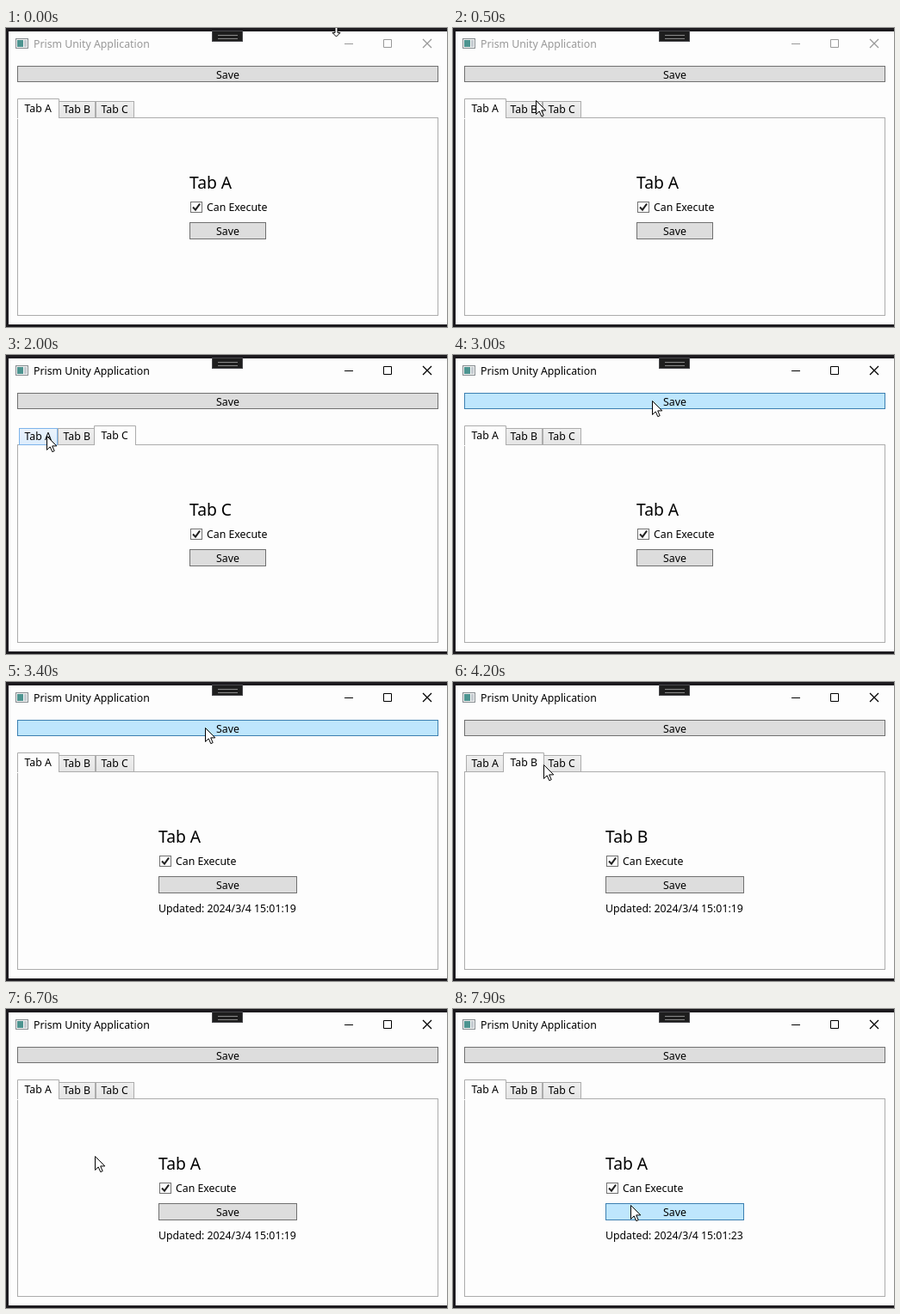
An HTML page with a canvas for the animation above (8000 ms loop, 512 by 348 pixels).

```html
<!DOCTYPE html>
<html lang="en">
<head>
<meta charset="utf-8">
<title>Tabbed window</title>
<style>
html, body { margin: 0; width: 100%; height: 100%; overflow: hidden; background: #1c1a1e; }
canvas { display: block; }
</style>
</head>
<body>
<canvas id="stage" width="512" height="348"></canvas>
<script>
const ctx = document.getElementById('stage').getContext('2d');
const LOOP = 8000, STEP = 100;
const FONT = '"Noto Sans", "Open Sans", sans-serif';
const PAPER = '#fdfdfd';

// The tabs share one pitch; right is the last pixel column.
const tabLeft = i => Math.round(15 + 44.5 * i);
const tabs = [...'ABC'].map((name, i) => ({ name, left: tabLeft(i), right: tabLeft(i + 1) - 1 }));

const place = {
  start: [383, 0], tabEdge: [96, 84],
  tabA: [47, 94], tabB: [86, 94], tabC: [124, 97],
  topSave: [231, 53], middle: [103, 171], save: [206, 228]
};
const moves = [
  [0, 500, 'tabEdge'], [500, 700, 'tabA'], [800, 1100, 'tabB'], [1300, 1600, 'tabC'],
  [1800, 2000, 'tabA'], [2600, 3000, 'topSave'], [3400, 4000, 'tabB'], [4000, 4400, 'tabC'],
  [4500, 4900, 'tabA'], [6500, 6700, 'middle'], [6800, 7400, 'save']
];
const clicks = [1300, 1800, 2200, 3200, 4000, 4500, 5800, 7500];

const within = (v, from, to) => v >= from && v < to;
const inside = ([px, py], r) => within(px, r.x, r.x + r.w) && within(py, r.y, r.y + r.h);

function pointerAt(t) {
  let [x, y] = place.start;
  for (const [from, to, goal] of moves) {
    if (t <= from) break;
    const k = Math.min(1, (t - from) / (to - from));
    const ease = k * k * (3 - 2 * k);
    x += (place[goal][0] - x) * ease;
    y += (place[goal][1] - y) * ease;
  }
  return [Math.round(x), Math.round(y)];
}

const topButton = { x: 13, y: 44, w: 489, h: 19 };
const contentLeft = time => time ? 177 : 213;
const contentButton = time => ({ x: contentLeft(time), y: 226, w: time ? 161 : 89, h: 20 });

function tabUnder([px, py], current) {
  if (!within(py, 85, 104) || within(px, current.left - 2, current.right + 3)) return null;
  return tabs.find(tab => within(px, tab.left, tab.right + 1));
}

// Replays the clicks so far: each one acts on whatever lies under the pointer.
function stateAt(t) {
  const state = { current: tabs[0], time: '', pressed: false };
  for (const click of clicks.filter(c => c <= t)) {
    const pointer = pointerAt(click);
    state.current = tabUnder(pointer, state.current) || state.current;
    if (inside(pointer, topButton) || inside(pointer, contentButton(state.time))) {
      state.pressed = t < click + STEP;
      if (!state.pressed) state.time = '15:01:' + (16 + Math.floor(click / 1000));
    }
  }
  return state;
}

function box(x, y, w, h, fill, stroke) {
  ctx.fillStyle = fill;
  ctx.fillRect(x, y, w, h);
  if (!stroke) return;
  ctx.strokeStyle = stroke;
  ctx.lineWidth = 1;
  ctx.strokeRect(x + .5, y + .5, w - 1, h - 1);
}

function text(str, x, y, { size = 12.3, color = '#000', align = 'left' } = {}) {
  ctx.font = `${size}px ${FONT}`;
  ctx.fillStyle = color;
  ctx.textAlign = align;
  ctx.fillText(str, x, y);
}

function lines(d, color, width = 1) {
  ctx.strokeStyle = color;
  ctx.lineWidth = width;
  ctx.stroke(new Path2D(d));
}

function drawButton(r, pointer, pressed) {
  const [fill, stroke] = !inside(pointer, r) ? ['#ddd', '#707070']
    : pressed ? ['#c4e5f6', '#2c628b'] : ['#bee6fd', '#3c7fb1'];
  box(r.x, r.y, r.w, r.h, fill, stroke);
  text('Save', r.x + r.w / 2, r.y + 14.5, { align: 'center' });
}

function drawFrame(active) {
  const color = active ? '#000' : '#999';
  box(0, 0, 512, 348, '#1c1a1e');
  box(3, 4, 509, 341, PAPER);
  box(239, 3, 36, 13, '#1e1e1e', '#48484c');
  for (const y of [8, 12]) box(246, y, 23, 1, '#8a8a8a');
  box(11, 12, 15, 12, '#f2f2f2', '#868c90');
  box(13, 14, 7, 8, '#4d9490');
  box(21, 14, 3, 8, '#c4cbd0');
  text('Prism Unity Application', 32, 23, { color });
  lines('M393 18.5h10M438.5 13.5h9v9h-9z', color);
  lines('M484 13l10 10M494 13l-10 10', color, 1.3);
}

function drawTab({ name, left, right }, selected, hover) {
  if (selected) {
    box(left - 2, 82, right - left + 5, 24, PAPER);
    lines(`M${left - 1.5} 105V82.5H${right + 2.5}V105`, '#acacac');
  } else {
    const fill = ctx.createLinearGradient(0, 85, 0, 104);
    fill.addColorStop(0, hover ? '#ecf4fc' : '#f0f0f0');
    fill.addColorStop(1, hover ? '#dcecfc' : '#e5e5e5');
    box(left, 85, right - left + 1, 20, fill, hover ? '#7eb4ea' : '#acacac');
  }
  text('Tab ' + name, left + 6.5, selected ? 98 : 99);
}

function drawTabs(current, pointer) {
  const hovered = tabUnder(pointer, current);
  box(13, 104, 489, 231, PAPER, '#acacac');
  for (const tab of tabs) if (tab !== current) drawTab(tab, false, tab === hovered);
  drawTab(current, true);
}

function drawContent({ current, time, pressed }, pointer) {
  const x = contentLeft(time);
  text('Tab ' + current.name, x, 187, { size: 19.3 });
  box(x + 1, 202, 14, 13, '#fff', '#707070');
  lines(`M${x + 4} 208.5l3 3.2 5-7`, '#212121', 2);
  text('Can Execute', x + 20, 213);
  drawButton(contentButton(time), pointer, pressed);
  if (time) text('Updated: 2024/3/4 ' + time, x, 268);
}

function drawPointer(shape, [x, y]) {
  const outline = new Path2D(shape);
  ctx.save();
  ctx.translate(x + .5, y + .5);
  ctx.fillStyle = '#fff';
  ctx.fill(outline);
  ctx.strokeStyle = '#000';
  ctx.lineWidth = 1;
  ctx.stroke(outline);
  ctx.restore();
}

const ARROW = 'M0 0V16L3.7 12.4 6.3 18.2 8.7 17.1 6.2 11.4H11.3Z';
const RESIZE = 'M-1.5-9V5H-4.5L0 9.5 4.5 5H1.5V-9Z';

function render(now) {
  const t = Math.floor(now % LOOP / STEP) * STEP;
  const pointer = pointerAt(t), state = stateAt(t);
  drawFrame(t >= clicks[0]);
  drawButton(topButton, pointer, state.pressed);
  drawTabs(state.current, pointer);
  drawContent(state, pointer);
  drawPointer(t < STEP ? RESIZE : ARROW, pointer);
}

const start = performance.now();
(function tick() {
  render(performance.now() - start);
  requestAnimationFrame(tick);
})();
</script>
</body>
</html>
```
